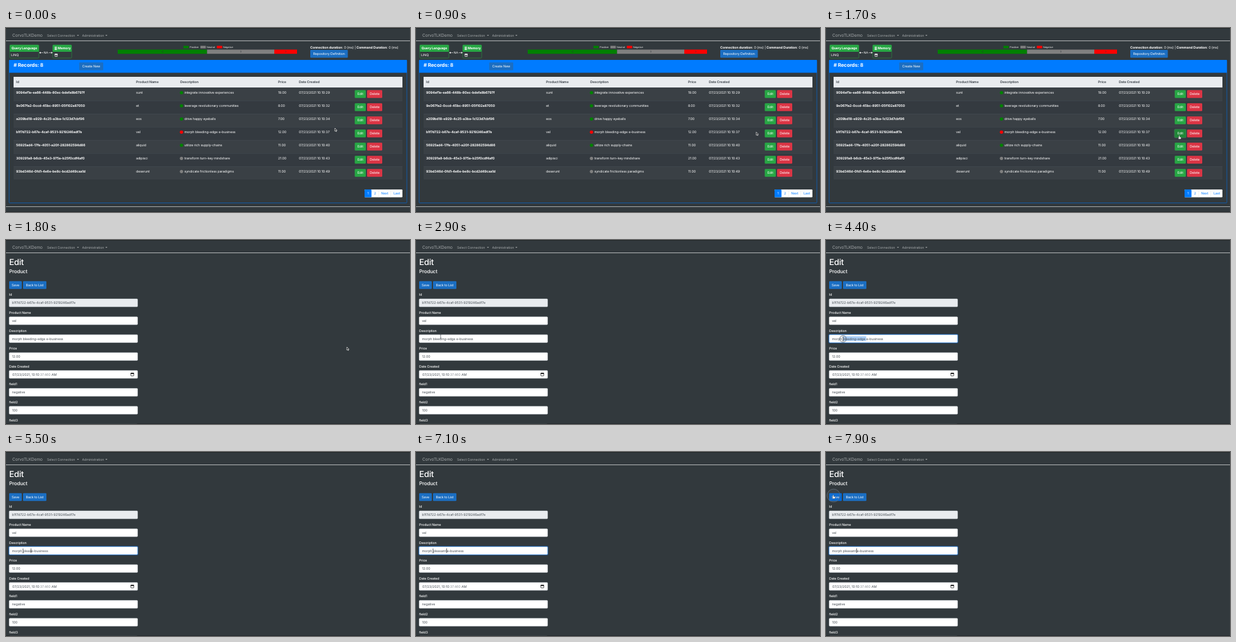
Recreate the animation shown at these times as an HTML page with a canvas. Size 640x294 px, loop 8 s.

```html
<!DOCTYPE html>
<html lang="en">
<head>
<meta charset="utf-8">
<title>Product editor</title>
<style>
html, body { margin: 0; width: 100%; height: 100%; overflow: hidden; background: #32393d; }
canvas { display: block; width: 640px; height: 294px; }
</style>
</head>
<body>
<canvas id="stage"></canvas>
<script>
const W = 640, H = 294, LOOP = 8000, STEP = 100;
const canvas = document.getElementById('stage');
const ctx = canvas.getContext('2d');
const dpr = window.devicePixelRatio || 1;
canvas.width = W * dpr;
canvas.height = H * dpr;

const BASE = 5.33;
const SANS = 'Inter, "Liberation Sans", sans-serif';
const ARIAL = '"Liberation Sans", Arial, sans-serif';
const BG = '#32393d', BLUE = '#007bff', BUTTON = '#1b6ec2';
const GREEN = '#28a745', RED = '#dc3545', INK = '#495057';
const DOTS = { g: '#008000', r: '#ff0000', n: '#808080' };

const ROWS = [
  ['9094ef1e-ea66-448b-80ec-bdefa8b6797f', 'sunt', 'g', 'integrate innovative experiences', '19.00', '29'],
  ['9e067fa2-0ccd-45bc-8951-05f102a87050', 'et', 'g', 'leverage revolutionary communities', '8.00', '32'],
  ['a209bd18-e929-4c25-a3ba-1c123d7cbf96', 'eos', 'g', 'drive happy eyeballs', '7.00', '34'],
  ['b1f7d722-b67e-4caf-9531-9219246adf7e', 'vel', 'r', 'morph bleeding-edge e-business', '12.00', '37'],
  ['56925ad4-17fe-4051-a20f-282862594d86', 'aliquid', 'g', 'utilize rich supply-chains', '11.00', '40'],
  ['309291a8-b6cb-45e3-975a-b25f0cdf4af0', 'adipisci', 'n', 'transform turn-key mindshare', '21.00', '43'],
  ['93bd346d-0fd1-4e6e-be8c-bcd2d49caa1d', 'deserunt', 'n', 'syndicate frictionless paradigms', '11.00', '49']
];

// Pointer path: time, x, y
const PATH = [
  [0, 522, 162], [600, 530, 166], [1500, 560, 173], [1700, 560, 173],
  [1800, 541, 173], [1900, 303, 187], [2300, 95, 160], [2800, 30, 118],
  [2900, 39, 154], [3700, 64, 158], [3800, 64, 158], [4400, 27, 158],
  [7100, 27, 158], [7500, 15, 58], [7800, 12, 70]
];

// Typed replacement: time, text
const TYPED = [
  [5100, 'p'], [5200, 'pl'], [5300, 'ple'], [5400, 'plea'], [5500, 'pleas'],
  [5800, 'pleasa'], [6200, 'pleasan'], [6700, 'pleasant ']
];

function setFont(size, weight, family = SANS) {
  ctx.font = `${weight} ${size}px ${family}`;
  ctx.letterSpacing = family === SANS ? `${-0.02 * size}px` : '0px';
}

// y is the middle of the capitals; returns the x where the text ends
function text(s, x, y, { color = '#fff', size = BASE, weight = 400, align = 'left', family = SANS } = {}) {
  setFont(size, weight, family);
  ctx.fillStyle = color;
  ctx.textAlign = align;
  ctx.fillText(s, x, y + size * 0.36);
  return x + ctx.measureText(s).width;
}

function width(s) {
  setFont(BASE, 400);
  return ctx.measureText(s).width;
}

function rect(x, y, w, h, color) {
  ctx.fillStyle = color;
  ctx.fillRect(x, y, w, h);
}

function box(x, y, w, h, fill, stroke, r = 1.3, line = 0.5) {
  ctx.beginPath();
  ctx.roundRect(x, y, w, h, r);
  if (fill) {
    ctx.fillStyle = fill;
    ctx.fill();
  }
  if (stroke) {
    ctx.strokeStyle = stroke;
    ctx.lineWidth = line;
    ctx.stroke();
  }
}

function button(label, x, y, w, color) {
  box(x, y, w, 12.5, color);
  text(label, x + w / 2, y + 6.3, { align: 'center' });
}

function triangle(x1, y1, x2, y2, x3, y3, color) {
  ctx.fillStyle = color;
  ctx.beginPath();
  ctx.moveTo(x1, y1);
  ctx.lineTo(x2, y2);
  ctx.lineTo(x3, y3);
  ctx.fill();
}

function navbar() {
  rect(0, 0, W, H, BG);
  rect(0, 0, W, 1, '#202527');
  rect(0, 20, W, 1, '#b4b7b9');
  rect(0, 293, W, 1, '#24292c');
  text('CorvoTLKDemo', 10, 11.5, { size: 6.67, color: '#a3a7a9' });
  [['Select Connection', 65, 114], ['Administration', 120.5, 159]].forEach(([label, x, tip]) => {
    text(label, x, 11.7, { color: '#a3a7a9' });
    triangle(tip - 1.6, 11, tip + 1.6, 11, tip, 12.7, '#a3a7a9');
  });
}

function card(x, w) {
  box(x, 27, w, 21, BG, GREEN);
  box(x, 27, w, 11, GREEN);
}

function summary() {
  card(6, 46);
  text('Query Language', 29, 32.5, { weight: 700, align: 'center', size: 5.2 });
  text('LINQ', 8, 43.5);
  card(74, 30);
  [30, 31.9, 33.8].forEach(y => box(77, y, 3.6, 1.3, '#fff', null, 0.5));
  text('Memory', 82, 32.5, { weight: 700, size: 5.2 });
  box(77.3, 41.5, 4.2, 4, null, '#fff', 0.4, 0.6);
  rect(77.3, 41.3, 4.2, 1.5, '#fff');
  rect(79.1, 42, 0.5, 3.5, '#fff');

  triangle(52.5, 39.5, 55, 38, 55, 41, '#fff');
  triangle(74, 39.5, 71.5, 38, 71.5, 41, '#fff');
  [[55, 4], [67.5, 4]].forEach(([x, w]) => rect(x, 39.2, w, 0.6, '#ddd'));
  text('NA', 63.2, 39.3, { align: 'center', size: 4.8 });

  const small = { size: 4, family: ARIAL };
  [['Positive', 281, 'g'], ['Neutral', 308, 'n'], ['Negative', 334, 'r']].forEach(([label, x, key]) => {
    rect(x, 28.5, 8.5, 4, DOTS[key]);
    text(label, x + 10, 30.5, { ...small, color: '#e8e8e8' });
  });
  [[177, 141.5, 'g', '4'], [318.5, 106.5, 'n', '3'], [425, 36, 'r', '1']].forEach(([x, w, key, n]) => {
    rect(x, 34.5, w, 6.7, DOTS[key]);
    text(n, x + w / 2, 37.8, { ...small, align: 'center', color: '#30363a' });
  });

  const bold = { weight: 700, size: 5.25 }, plain = { size: 5.25 };
  let x = text('Connection duration:', 482, 31, bold);
  x = text(' 0 (ms) | ', x, 31, plain);
  x = text('Command Duration:', x, 31, bold);
  text(' 0 (ms)', x, 31, plain);
  button('Repository Definition', 482, 35, 59.5, BUTTON);
}

function listPage(t) {
  navbar();
  summary();

  box(5, 51.5, 630, 228, null, '#0b62c0', 1, 0.8);
  rect(5, 51, 630, 20.5, BLUE);
  text('# Records: 8', 12, 59.5, { size: 8, weight: 700 });
  button('Create New', 116, 55, 38, BUTTON);

  rect(12, 78, 616, 17, '#e9ecef');
  [['Id', 16], ['Product Name', 206], ['Description', 276], ['Price', 431], ['Date Created', 464]]
    .forEach(([label, x]) => text(label, x, 86.5, { weight: 700, color: INK }));

  ROWS.forEach(([id, name, key, note, price, sec], i) => {
    const y = 95 + i * 21, mid = y + 8.3;
    rect(12, y, 616, 21, i % 2 ? '#343a40' : '#3a4045');
    rect(12, y, 616, 0.5, '#454d55');
    text(id, 16, mid, { weight: 700 });
    text(name, 206, mid);
    ctx.fillStyle = DOTS[key];
    ctx.beginPath();
    ctx.arc(278, mid, 2.6, 0, Math.PI * 2);
    ctx.fill();
    text(note, 282.5, mid);
    text(price, 431, mid);
    text('07/23/2021 10:10:' + sec, 464, mid);
    const over = i === 3 && t >= 1400;
    if (over) box(551.5, y + 3.2, 19.5, 14.5, 'rgba(72,180,97,.45)', null, 2);
    button('Edit', 552.5, y + 4.2, 17.5, over ? '#218838' : GREEN);
    button('Delete', 572, y + 4.2, 24, RED);
  });

  box(568, 258, 60, 12.5, '#fff');
  box(568, 258, 11, 12.5, BLUE);
  [['1', 573.5, '#fff'], ['2', 584.5, BLUE], ['Next', 600, BLUE], ['Last', 619, BLUE]]
    .forEach(([label, x, color]) => text(label, x, 264.3, { color, align: 'center' }));
  [590, 609.5].forEach(x => rect(x, 258, 0.4, 12.5, '#dee2e6'));
  rect(0, 285, W, 1, '#a9adaf');
}

function description(t, y) {
  const head = 'morph ', tail = 'e-business', left = 9.5;
  const start = left + width(head);
  const done = TYPED.filter(([at]) => t >= at).pop();
  const word = done ? done[1] : 'bleeding-edge ';
  const end = start + width(word);
  if (!done && t > 3800) {
    const from = Math.max(start, Math.min(end, pointer(t)[0]));
    rect(from, y - 3.8, end - from, 7.4, '#a9cdf5');
  }
  text(head + word + tail, left, y, { color: INK });
  if (done) rect(end - 0.3, y - 3.5, 0.7, 7, '#111');
}

function editPage(t) {
  navbar();
  text('Edit', 5, 35, { size: 13.3, weight: 500 });
  text('Product', 5, 50, { size: 8, weight: 500 });
  button('Save', 5, 65.7, 20, t >= 7700 ? '#0069d9' : BUTTON);
  button('Back to List', 27, 65.7, 37, BUTTON);

  const fields = [
    ['Id', ROWS[3][0]], ['Product Name', 'vel'], ['Description', null], ['Price', '12.00'],
    ['Date Created', null], ['field1', 'negative'], ['field2', '100'], ['field3', '']
  ];
  fields.forEach(([label, value], i) => {
    const y = 100.4 + i * 28.6;
    const focus = i === 2 && t >= 3800;
    text(label, 5, y - 12.8, { weight: 500, size: 5.25 });
    if (focus) box(4, y - 7.4, 205.5, 14.7, 'rgba(0,123,255,.45)', null, 2);
    box(5, y - 6.3, 203.5, 12.6, i ? '#fff' : '#e9ecef', focus ? '#5c9fe6' : '#ced4da');
    if (i === 2) {
      description(t, y);
    } else if (i === 4) {
      let x = text('07/23/2021, 10:10:', 10, y, { color: INK });
      x = text('37.460', x, y, { color: '#8d9297' });
      text(' AM', x, y, { color: INK });
      box(197.8, y - 2.1, 4.6, 4.4, null, '#111', 0.4, 0.7);
      rect(197.6, y - 2.4, 5, 1.6, '#111');
    } else {
      text(value, 9.5, y, { color: INK });
    }
  });
}

function pointer(t) {
  let k = 0;
  while (k < PATH.length - 2 && t >= PATH[k + 1][0]) k++;
  const [t0, x0, y0] = PATH[k], [t1, x1, y1] = PATH[k + 1];
  const p = Math.min(1, Math.max(0, (t - t0) / (t1 - t0)));
  return [x0 + (x1 - x0) * p, y0 + (y1 - y0) * p];
}

function arrow(x, y) {
  ctx.beginPath();
  [[0, -2], [0, 3], [1.2, 2], [2, 3.6], [2.8, 3.2], [2, 1.7], [3.4, 1.5]]
    .forEach(([dx, dy]) => ctx.lineTo(x - 1 + dx, y + dy));
  ctx.closePath();
  ctx.fillStyle = '#15181a';
  ctx.strokeStyle = '#f4f4f4';
  ctx.lineWidth = 0.7;
  ctx.fill();
  ctx.stroke();
}

function hand(x, y) {
  box(x - 1.7, y, 4, 3.6, '#fff', '#222', 1.2, 0.4);
  box(x - 1, y - 2.4, 1.2, 4, '#fff', '#222', 0.6, 0.3);
  rect(x - 0.8, y, 0.8, 1.6, '#fff');
}

function beam(x, y) {
  rect(x - 0.4, y - 3, 0.8, 6.2, '#555b60');
  [-3.3, 2.8].forEach(dy => rect(x - 1.2, y + dy, 2.4, 0.6, '#555b60'));
}

function ring(x, y, r) {
  ctx.beginPath();
  ctx.arc(x, y, r, 0, Math.PI * 2);
  ctx.fillStyle = 'rgba(130,140,150,.12)';
  ctx.strokeStyle = 'rgba(100,112,124,.9)';
  ctx.lineWidth = 0.9;
  ctx.fill();
  ctx.stroke();
}

function drawPointer(t) {
  const [x, y] = pointer(t);
  if (t >= 3800 && t < 4600) ring(x, y, 5.4);
  if (t >= 7900) ring(x, y - 0.5, 10.3);
  const link = (t >= 1400 && t < 1800) || t >= 7700;
  const inField = t >= 2900 && y > 151 && y < 164;
  if (link) hand(x, y + 1);
  else if (inField) beam(x, y);
  else arrow(x, y);
}

function frame(now) {
  const t = Math.floor((now % LOOP) / STEP) * STEP;
  ctx.setTransform(dpr, 0, 0, dpr, 0, 0);
  ctx.textRendering = 'geometricPrecision';
  if (t < 1800) listPage(t);
  else editPage(t);
  drawPointer(t);
}

const began = performance.now();
function tick() {
  frame(performance.now() - began);
  requestAnimationFrame(tick);
}
tick();
</script>
</body>
</html>
```
